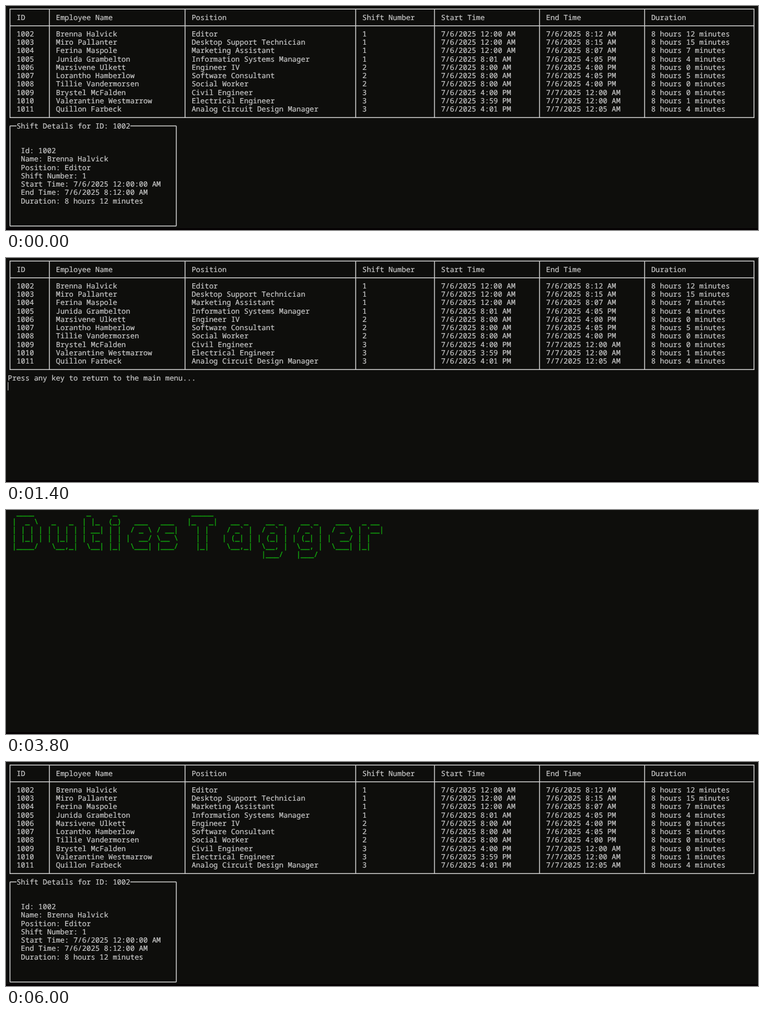
An HTML page that plays this animation: 1280x382 px, repeating every 6200 ms.

```html
<!DOCTYPE html>
<html lang="en">
<head>
<meta charset="utf-8">
<title>Shift console</title>
<style>
html, body { margin: 0; width: 100%; height: 100%; overflow: hidden; background: #0e0e0c; }
svg { display: block; width: 1280px; height: 382px; }
text {
  font: 12.4167px "Noto Sans Mono", "DejaVu Sans Mono", monospace;
  color: #ccc; fill: currentColor; stroke: currentColor; stroke-width: .2;
  white-space: pre; text-rendering: geometricPrecision;
  font-variant-ligatures: none;
}
path { fill: none; stroke: #ccc; stroke-width: 1.5; }
.selected text { color: #3b78ff; }
#banner text { color: #13a10e; stroke-width: .5; }

/* Hard cuts between screens; percentages of the 6.2 s loop */
#screens g[id] { animation: 6.2s step-end infinite; }
#screens #table { animation-name: table; }
#screens #panel { animation-name: panel; }
#screens #prompt { animation-name: prompt; }
#screens #cursor { animation-name: cursor; }
#screens #banner { animation-name: banner; }
#screens #menu { animation-name: menu; }
#screens #firstChoice { animation-name: firstChoice; }
#screens #secondChoice { animation-name: secondChoice; }
#screens #picker { animation-name: picker; }
@keyframes table {
  0%, 22.58%, 64.516%, 100% { visibility: visible; }
  19.354%, 38.709% { visibility: hidden; }
}
@keyframes panel {
  0%, 87.096%, 100% { visibility: visible; }
  19.354% { visibility: hidden; }
}
@keyframes prompt {
  0%, 38.709%, 100% { visibility: hidden; }
  22.58% { visibility: visible; }
}
@keyframes cursor {
  0%, 29.032%, 38.709%, 100% { visibility: hidden; }
  22.58%, 35.483% { visibility: visible; }
}
@keyframes banner {
  0%, 64.516%, 100% { visibility: hidden; }
  38.709% { visibility: visible; }
}
@keyframes menu {
  0%, 61.29%, 100% { visibility: hidden; }
  38.709% { visibility: visible; }
}
@keyframes firstChoice {
  0%, 51.612%, 100% { visibility: hidden; }
  38.709% { visibility: visible; }
}
@keyframes secondChoice {
  0%, 61.29%, 100% { visibility: hidden; }
  51.612% { visibility: visible; }
}
@keyframes picker {
  0%, 83.87%, 100% { visibility: hidden; }
  64.516% { visibility: visible; }
}
</style>
</head>
<body>
<svg viewBox="0 0 1280 382">
  <rect width="1280" height="382" fill="#0e0e0c"/>
  <path d="M1279.5 0V382" style="stroke:#080808;stroke-width:1"/>
  <path d="M0 380.5H1280" style="stroke:#050103;stroke-width:3"/>
  <g id="screens">
    <g id="table"></g>
    <g id="panel"></g>
    <g id="prompt"></g>
    <g id="cursor"><path d="M3.5 211.5V225.8" style="stroke-width:1"/></g>
    <g id="banner">
      <text xml:space="preserve">  ____            _     _                 _____ </text>
      <text xml:space="preserve"> |  _ \   _   _  | |_  (_)   ___   ___   |_   _|   __ _    __ _    __ _    ___   _ __ </text>
      <text xml:space="preserve"> | | | | | | | | | __| | |  / _ \ / __|    | |    / _` |  / _` |  / _` |  / _ \ | '__|</text>
      <text xml:space="preserve"> | |_| | | |_| | | |_  | | |  __/ \__ \    | |   | (_| | | (_| | | (_| | |  __/ | |   </text>
      <text xml:space="preserve"> |____/   \__,_|  \__| |_|  \___| |___/    |_|    \__,_|  \__, |  \__, |  \___| |_|   </text>
      <text xml:space="preserve">                                                          |___/   |___/ </text>
    </g>
    <g id="menu"></g>
    <g id="firstChoice"></g>
    <g id="secondChoice"></g>
    <g id="picker"></g>
  </g>
</svg>
<script>
const $ = id => document.getElementById(id);
const cellX = col => 3 + col * 7.45;
const midX = col => cellX(col + 0.5);
const midY = row => 5.3 + row * 14.23;
const baseline = row => midY(row) + 4;

function add(parent, tag, attrs) {
  const el = document.createElementNS("http://www.w3.org/2000/svg", tag);
  for (const key in attrs) el.setAttribute(key, attrs[key]);
  return parent.appendChild(el);
}
function write(parent, col, row, string) {
  add(parent, "text", { x: cellX(col), y: baseline(row) }).textContent = string;
}
function writeLines(parent, col, row, lines) {
  lines.forEach((line, i) => write(parent, col, row + i, line));
}
function writeSelected(parent, row, label) {
  const group = add(parent, "g", { class: "selected" });
  write(group, 0, row, ">");
  write(group, 2, row, label);
}
const hLine = (row, from, to) => `M${midX(from)} ${midY(row)}H${midX(to)}`;
const vLine = (col, from, to) => `M${midX(col)} ${midY(from)}V${midY(to)}`;

const columns = [2, 11, 42, 81, 99, 123, 147];
const table = [
  "ID|Employee Name|Position|Shift Number|Start Time|End Time|Duration",
  "1002|Brenna Halvick|Editor|1|7/6/2025 12:00 AM|7/6/2025 8:12 AM|8 hours 12 minutes",
  "1003|Miro Pallanter|Desktop Support Technician|1|7/6/2025 12:00 AM|7/6/2025 8:15 AM|8 hours 15 minutes",
  "1004|Ferina Maspole|Marketing Assistant|1|7/6/2025 12:00 AM|7/6/2025 8:07 AM|8 hours 7 minutes",
  "1005|Junida Grambelton|Information Systems Manager|1|7/6/2025 8:01 AM|7/6/2025 4:05 PM|8 hours 4 minutes",
  "1006|Marsivene Ulkett|Engineer IV|2|7/6/2025 8:00 AM|7/6/2025 4:00 PM|8 hours 0 minutes",
  "1007|Lorantho Hamberlow|Software Consultant|2|7/6/2025 8:00 AM|7/6/2025 4:05 PM|8 hours 5 minutes",
  "1008|Tillie Vandermorsen|Social Worker|2|7/6/2025 8:00 AM|7/6/2025 4:00 PM|8 hours 0 minutes",
  "1009|Brystel McFalden|Civil Engineer|3|7/6/2025 4:00 PM|7/7/2025 12:00 AM|8 hours 0 minutes",
  "1010|Valerantine Westmarrow|Electrical Engineer|3|7/6/2025 3:59 PM|7/7/2025 12:00 AM|8 hours 1 minutes",
  "1011|Quillon Farbeck|Analog Circuit Design Manager|3|7/6/2025 4:01 PM|7/7/2025 12:05 AM|8 hours 4 minutes"
].map(line => line.split("|"));

table.forEach((cells, i) => cells.forEach((cell, c) =>
  write($("table"), columns[c], i ? i + 2 : 1, cell)));
add($("table"), "path", {
  d: [0, 2, 13].map(row => hLine(row, 0, 170)).join("") +
     [...columns.map(col => col - 2), 170].map(col => vLine(col, 0, 13)).join(""),
  "stroke-linecap": "square"
});

write($("panel"), 2, 14, "Shift Details for ID: 1002");
writeLines($("panel"), 3, 17, [
  "Id: 1002",
  "Name: " + table[1][1],
  "Position: Editor",
  "Shift Number: 1",
  "Start Time: 7/6/2025 12:00:00 AM",
  "End Time: 7/6/2025 8:12:00 AM",
  "Duration: 8 hours 12 minutes"
]);
add($("panel"), "path", {
  d: hLine(14, 0, 1.5) + hLine(14, 27.5, 38) + hLine(26, 0, 38) + vLine(0, 14, 26) + vLine(38, 14, 26)
});

write($("prompt"), 0, 14, "Press any key to return to the main menu...");

[...$("banner").children].forEach((line, row) => {
  line.setAttribute("x", cellX(0));
  line.setAttribute("y", baseline(row));
});

const [viewAll, viewOne] = ["View All Shifts", "View Shift by ID"];
write($("menu"), 0, 6, "Select an option:");
writeLines($("menu"), 2, 10, ["Create Shift", "Update Shift", "Delete Shift", "Exit"]);
writeSelected($("firstChoice"), 8, viewAll);
write($("firstChoice"), 2, 9, viewOne);
write($("secondChoice"), 2, 8, viewAll);
writeSelected($("secondChoice"), 9, viewOne);

write($("picker"), 0, 14, "Select an employee to view shift details:");
writeSelected($("picker"), 16, "1002");
writeLines($("picker"), 2, 17, table.slice(2).map(cells => cells[0]));
</script>
</body>
</html>
```
